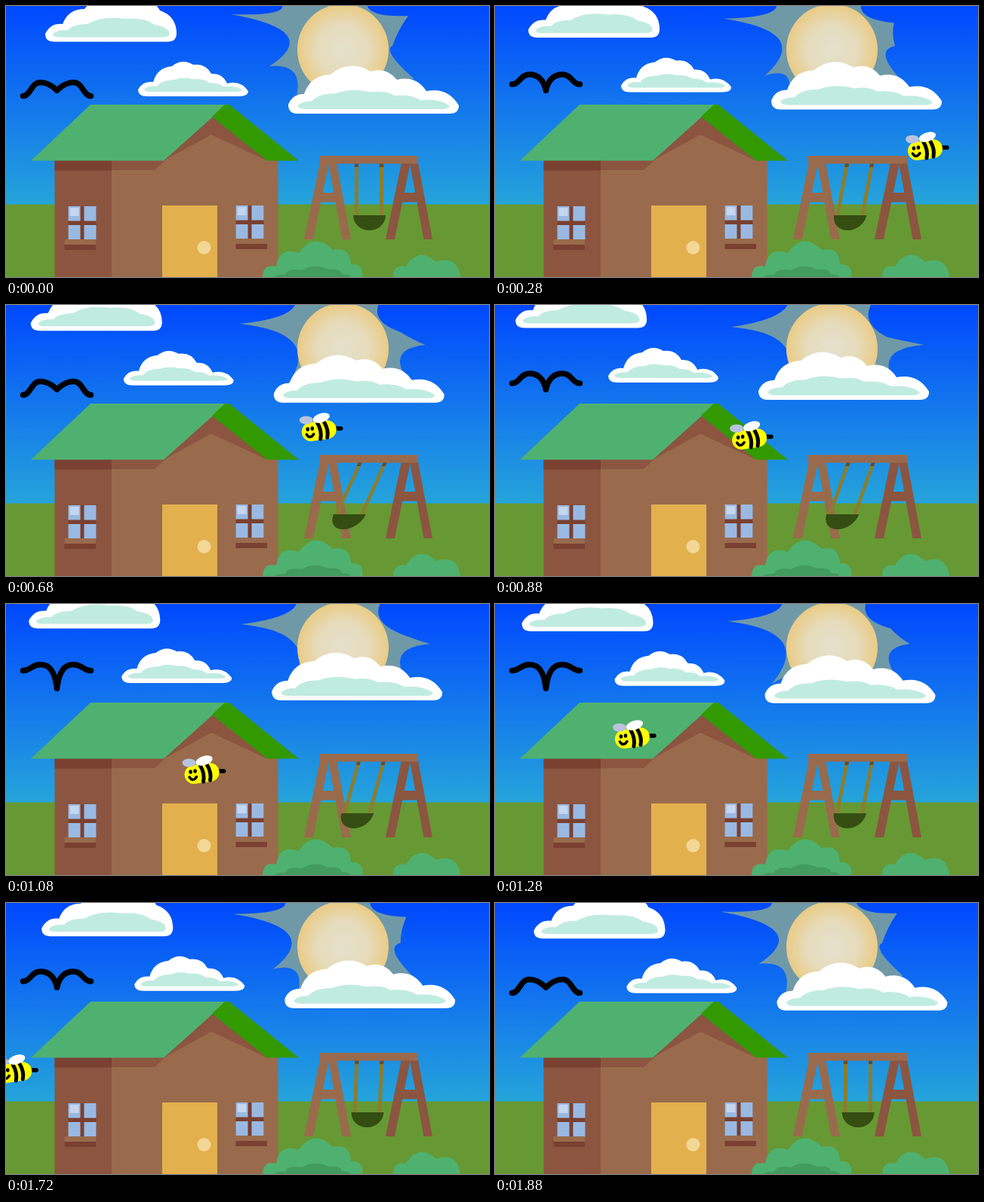
These frames come from a looping animation (640 px wide and 360 px high, 1920 ms). An HTML page with a canvas:

```html
<!DOCTYPE html>
<html lang="en">
<head>
<meta charset="utf-8">
<title>Sunny garden</title>
<style>
html, body { margin: 0; width: 100%; height: 100%; overflow: hidden; background: #0048ff; }
canvas { display: block; }
</style>
</head>
<body>
<canvas id="stage" width="640" height="360"></canvas>
<script>
const ctx = document.getElementById('stage').getContext('2d');
const LOOP = 1920, STEP = 40, TURN = 920, HORIZON = 263.5;
const TAN = '#996b4c', BROWN = '#8b5540', DARK = '#7a4030', LEAF = '#4fb170', MOSS = '#429b5f', MINT = '#c0ecdf';

const lerp = (a, b, p) => a + (b - a) * p;

function fill(color, path) {
  ctx.fillStyle = color;
  ctx.fill(typeof path === 'string' ? new Path2D(path) : path);
}
function line(color, width, path) {
  ctx.strokeStyle = color;
  ctx.lineWidth = width;
  ctx.stroke(new Path2D(path));
}
function rect(color, x, y, w, h) {
  ctx.fillStyle = color;
  ctx.fillRect(x, y, w, h);
}
function oval(color, x, y, rx, ry = rx, turn = 0) {
  ctx.fillStyle = color;
  ctx.beginPath();
  ctx.ellipse(x, y, rx, ry, turn, 0, 7);
  ctx.fill();
}
function at(x, y, draw, sx = 1, sy = 1) {
  ctx.save();
  ctx.translate(x, y);
  ctx.scale(sx, sy);
  draw();
  ctx.restore();
}

// Scallops between the notches [x, y], closed by a flat rounded base
function puff(base, bulge, notches) {
  const path = new Path2D(), last = notches.length - 1;
  const [left, right] = [notches[0][0], notches[last][0]];
  path.moveTo(...notches[0]);
  for (let i = 0; i < last; i++) {
    const [[x, y], [u, v]] = [notches[i], notches[i + 1]];
    path.quadraticCurveTo((x + u) / 2 + (v - y) * bulge, (y + v) / 2 - (u - x) * bulge, u, v);
  }
  path.quadraticCurveTo(right, base, right - 12, base);
  path.lineTo(left + 12, base);
  path.quadraticCurveTo(left, base, ...notches[0]);
  return { path, base, mid: (left + right) / 2 };
}
// The shade inside a puff is the same outline, flattened
function shade(color, { path, base, mid }, lift, sx, sy) {
  at(mid, base - lift, () => {
    ctx.translate(-mid, -base);
    fill(color, path);
  }, sx, sy);
}

const clouds = [
  puff(47.5, .35, [[52, 37], [75, 24], [104, 4], [160, -14], [204, 6], [226, 36]]),
  puff(120, .35, [[175, 111], [195, 101], [220, 80], [248, 78], [272, 90], [293, 103], [321, 113]]),
  puff(143, .35, [[374, 131], [395, 117], [430, 91], [483, 87], [518, 98], [557, 113], [600, 132]])
];
const bush = puff(372, .6, [[340, 360], [358, 346], [388, 328], [433, 324], [457, 343], [472, 360]]);
const shrub = puff(372, .6, [[513, 360], [530, 346], [570, 340], [602, 360]]);

// Tips of the sun rays: x, y, drift, and how far the edge after it sags to the core
const CORE = [446, 30];
const tips = [
  [298, 11, 16, 19, .35], [366, -2, 24, -2, 0], [478, -2, 22, 0, .4], [533, 13, -14, 31, .05],
  [512, 53, 59, 0, .35], [541, 97, -18, -6, 0], [385, 120, 10, 0, .35], [349, 80, 28, 41, .8]
];

function rays(p) {
  const pts = tips.map(([x, y, dx, dy]) => [x + dx * p, y + dy * p]);
  const path = new Path2D();
  path.moveTo(...pts[0]);
  pts.forEach(([x, y], i) => {
    const [u, v] = pts[(i + 1) % pts.length], sag = tips[i][4];
    path.quadraticCurveTo(lerp((x + u) / 2, CORE[0], sag), lerp((y + v) / 2, CORE[1], sag), u, v);
  });
  fill('#7099a8', path);
}

const sky = ctx.createLinearGradient(0, 0, 0, HORIZON);
sky.addColorStop(0, '#0048ff');
sky.addColorStop(1, '#25a4da');
const sun = ctx.createRadialGradient(446.5, 58, 0, 446.5, 58, 60.5);
sun.addColorStop(0, '#e4e0cc');
sun.addColorStop(.55, '#e6dcbc');
sun.addColorStop(1, '#eacb85');

function bird(step) {
  const beat = Math.cos((step + .5) / 6 * 2 * Math.PI);
  const tip = 104 + 18 * beat, peak = 91 + 12 * beat;
  for (const side of [-1, 1]) {
    at(67.5, 0, () => line('#000', 7.5,
      `M45 ${tip}C35 ${tip} 34 ${peak} 22 ${peak}S3 ${peak + 8} 0 112`), side);
  }
}

function pane(x, y, sill) {
  rect(DARK, x, y, 37, 44);
  for (const dx of [0, 21]) for (const dy of [0, 25]) rect('#99b9e2', x + dx, y + dy, 16, 19.5);
  rect('#c5d6ef', x + 2, y + 2, 12, 11);
  rect(TAN, sill, y + 44, 41.5, 7);
  rect(DARK, sill, y + 51, 41.5, 7);
}

function house() {
  rect(BROWN, 64.5, 205, 76.5, 155);
  rect(DARK, 64.5, 205, 76.5, 13.5);
  fill(BROWN, 'M140 205H209L273 147 346 205V218H140Z');
  fill(TAN, 'M140 218H197L212 204 272 171 345 205H360.5V360H140Z');
  fill(LEAF, 'M112 131H292L209 205.5H33Z');
  fill('#339900', 'M290 131H296L388 205.5H346L273 147Z');
  pane(82.5, 266, 77.5);
  pane(304.5, 265, 304.5);
  rect('#e3b04e', 207, 265, 73, 95);
  oval('#f3d795', 262.5, 321, 9);
}

function trestle(color, x) {
  at(x, 0, () => fill(color, 'M21 208h12l-21 102h-12ZM32 208h11l19 102h-11.5ZM16 248h34v12.5h-36Z'));
}

function swing(t) {
  trestle(TAN, 395);
  trestle(BROWN, 503);
  // swift swing out, slower return; the lean pivots around y = 220
  const out = 680;
  const shift = -26 * (t < out ? t / out : ((LOOP - t) / (LOOP - out)) ** 1.3);
  const lean = shift / 58;
  ctx.save();
  ctx.transform(1, 0, lean, 1, -220 * lean, 0);
  for (const x of [462, 495]) {
    rect('#8b7d30', x, 209, 5, 70);
    rect('#6a4a28', x, 209, 5, 5);
  }
  fill('#344e12', 'M460 278H503A21.5 20 0 0 1 460 278Z');
  ctx.restore();
  rect(TAN, 415, 199, 131, 10.5);
}

function bee() {
  line('#000', 5.5, 'M42 -3L52 -3');
  line('#ff0', 25, 'M12.5 1.5L33.5 -1.5');
  line('#000', 5, 'M21 -10Q27 0 25 11M30 -11Q36 -1 34 9');
  oval('#000', 8, -2, 2.3, 2.8);
  oval('#000', 14, -3, 2.3, 2.8);
  line('#000', 3.5, 'M6.5 5Q11 12 16 4.500');
  oval('#b9c3de', 6, -14, 9, 5.5);
  oval('#fff', 26, -17, 11.5, 6, -.3);
}

function draw(t) {
  const p = t < TURN ? t / TURN : (LOOP - 20 - t) / (LOOP - 20 - TURN);
  ctx.lineCap = ctx.lineJoin = 'round';
  rect('#669933', 0, 0, 640, 360);
  rect(sky, 0, 0, 640, HORIZON);
  rays(p);
  oval(sun, 446.5, 58, 60.5);
  at(-26 * p, -17.8 * p, () => {
    for (const cloud of clouds) {
      fill('#fff', cloud.path);
      shade(MINT, cloud, 6, .89, .4);
    }
  });
  bird(t / STEP);
  house();
  swing(t);
  fill(LEAF, bush.path);
  shade(MOSS, bush, 6, .76, .34);
  fill(LEAF, shrub.path);
  at(655.6 - .388 * t, 191 - 34 * Math.cos((t - 120) / 640 * 2 * Math.PI), bee);
}

const start = performance.now();
function tick() {
  const t = (performance.now() - start) % LOOP;
  draw(Math.floor(t / STEP) * STEP);
  requestAnimationFrame(tick);
}
tick();
</script>
</body>
</html>
```
